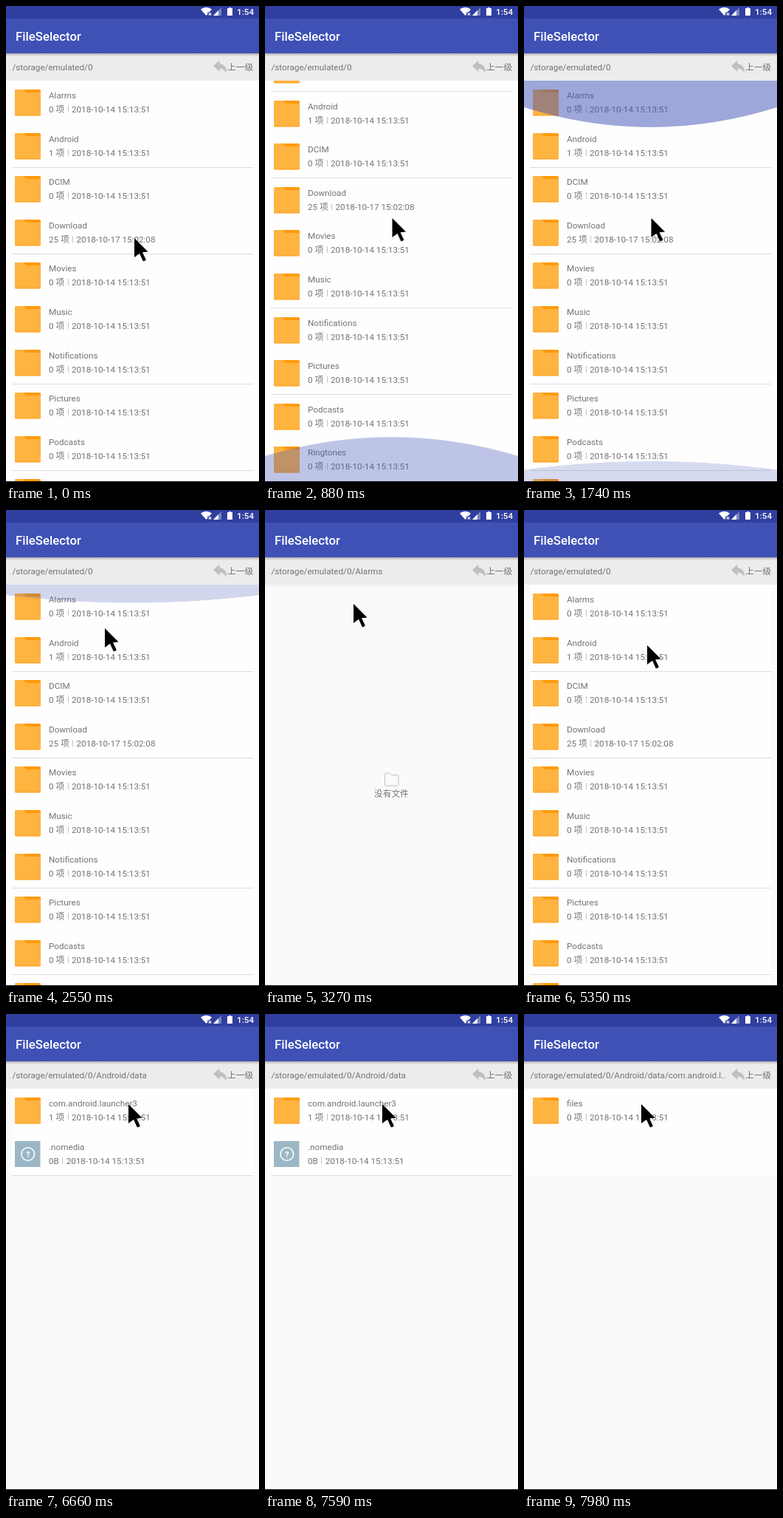
These frames come from a looping animation (343x644 px, 8 s). An HTML page:

```html
<!DOCTYPE html>
<html lang="zh-CN">
<head>
<meta charset="utf-8">
<title>FileSelector</title>
<style>
html, body { margin: 0; width: 100%; height: 100%; overflow: hidden; background: #fafafa; }
#stage {
  position: relative; width: 343px; height: 644px; overflow: hidden; background: #fafafa;
  font: 11.7px/14px Roboto, "Noto Sans CJK SC", "Noto Sans CJK", sans-serif;
  color: #737373; white-space: nowrap;
}
#stage div, #stage svg { position: absolute; }
/* Low specificity, so the id rules below can set the animation name. */
.anim { animation: 8s step-end -2ms infinite; }

#status { width: 343px; height: 17px; background: #303f9f; }
#clock { left: 313px; top: 1px; color: #fff; font-weight: 500; }
#appbar { top: 17px; width: 343px; height: 47px; background: #3f51b5; }
#title { left: 13px; top: 14px; font-size: 16.8px; line-height: 20px; font-weight: 500; color: #fff; }
#pathbar { top: 64px; width: 343px; height: 37px; background: #ececec; }
#shadow { top: 64px; width: 343px; height: 4px; background: linear-gradient(#0004, #0000); }
#up { left: 300px; top: 76px; }
#edge { top: 643px; width: 343px; height: 1px; background: #000; }

.page { inset: 0; }
.path { left: 8.5px; top: 76px; }
.list { left: 0; top: 101px; width: 343px; height: 542px; overflow: hidden; }
.paper { left: 8px; width: 327px; background: #fefefe; }
.full { left: 0; width: 343px; }
.rows { width: 343px; }
.row { left: 0; width: 343px; height: 58px; }
.row svg { left: 12px; top: 12px; }
.name { left: 58px; top: 13px; }
.info { left: 58px; top: 32px; }
.info i { display: inline-block; width: 1px; height: 9px; margin: 0 4.4px; background: #c4c4c4; }
.line { left: 8px; width: 327px; height: 1px; background: #dcdcdc; }
.glow { left: 0; }
#topGlow { top: 101px; transform-origin: 0 0; }
#bottomGlow { top: 580px; transform-origin: 0 100%; }
#cursor { left: 0; top: 0; }

#home { animation-name: home; }
#wide { animation-name: wide; }
#homeRows { animation-name: scroll; }
#home .rest { animation-name: rest; }
#home .moved { animation-name: moved; }
#alarms { animation-name: alarms; }
#android { animation-name: android; }
#data { animation-name: data; }
#launcher { animation-name: launcher; }
#topGlow { animation-name: topGlow; }
#bottomGlow { animation-name: bottomGlow; }
#cursor { animation-name: cursor; }

@keyframes home { 0%, 50.75% { opacity: 1 } 39%, 67%, 100% { opacity: 0 } }
@keyframes wide { 0% { opacity: 1 } 39%, 100% { opacity: 0 } }
@keyframes alarms { 0%, 50.75%, 100% { opacity: 0 } 39% { opacity: 1 } }
@keyframes android { 0%, 75.25%, 100% { opacity: 0 } 67% { opacity: 1 } }
@keyframes data { 0%, 98.25%, 100% { opacity: 0 } 75.25% { opacity: 1 } }
@keyframes launcher { 0% { opacity: 0 } 98.25%, 100% { opacity: 1 } }
@keyframes scroll {
  0%, 20%, 100% { transform: none }
  9.25% { transform: translateY(-20px) }
  11% { transform: translateY(-44px) }
  18.125% { transform: translateY(-24px) }
}
@keyframes rest { 0%, 20%, 100% { opacity: 1 } 9.25% { opacity: 0 } }
@keyframes moved { 0%, 20%, 100% { opacity: 0 } 9.25% { opacity: 1 } }
@keyframes bottomGlow {
  0%, 30.125%, 100% { opacity: 0; transform: scaleY(0) }
  11% { opacity: .33; transform: scaleY(.95) }
  13% { opacity: .42; transform: scaleY(1) }
  14.5% { opacity: .4; transform: scaleY(.92) }
  16.25% { opacity: .35; transform: scaleY(.78) }
  18.125% { opacity: .3; transform: scaleY(.65) }
  20% { opacity: .25; transform: scaleY(.53) }
  21.75% { opacity: .2; transform: scaleY(.43) }
  23.25% { opacity: .16; transform: scaleY(.34) }
  25% { opacity: .12; transform: scaleY(.25) }
  26.75% { opacity: .08; transform: scaleY(.16) }
  28.375% { opacity: .04; transform: scaleY(.08) }
}
@keyframes topGlow {
  0%, 42.375%, 100% { opacity: 0; transform: scaleY(0) }
  20% { opacity: .36; transform: scaleY(.75) }
  21.75% { opacity: .5; transform: scaleY(1) }
  23.25% { opacity: .48; transform: scaleY(.95) }
  25% { opacity: .43; transform: scaleY(.82) }
  26.75% { opacity: .38; transform: scaleY(.7) }
  28.375% { opacity: .33; transform: scaleY(.59) }
  30.125% { opacity: .28; transform: scaleY(.48) }
  31.875% { opacity: .23; transform: scaleY(.39) }
  33.625% { opacity: .18; transform: scaleY(.3) }
  35.25% { opacity: .14; transform: scaleY(.23) }
  37.125% { opacity: .1; transform: scaleY(.17) }
  39% { opacity: .06; transform: scaleY(.11) }
  40.875% { opacity: .03; transform: scaleY(.07) }
}
@keyframes cursor {
  0% { transform: translate(174px, 314px) }
  1.875% { transform: translate(173px, 313px) }
  9.25% { transform: translate(172.5px, 287px) }
  28.375% { transform: translate(168px, 262px) }
  30.125% { transform: translate(152px, 210px) }
  31.875% { transform: translate(134px, 160px) }
  33.625% { transform: translate(123px, 134px) }
  35.25% { transform: translate(120px, 127px) }
  42.375% { transform: translate(142px, 119px) }
  44.125% { transform: translate(196px, 102px) }
  45.875% { transform: translate(258px, 86px) }
  47.5% { transform: translate(296px, 79px) }
  49.25% { transform: translate(304px, 78px) }
  52.625% { transform: translate(240px, 104px) }
  54.625% { transform: translate(168px, 134px) }
  56.625% { transform: translate(165px, 160px) }
  58.375% { transform: translate(166px, 177px) }
  60% { transform: translate(167px, 183px) }
  68.625% { transform: translate(167px, 165px) }
  70.25% { transform: translate(166px, 138px) }
  71.75% { transform: translate(166px, 124px) }
  83.25% { transform: translate(166px, 122px) }
  85.125% { transform: translate(196px, 144px) }
  86.75% { transform: translate(252px, 170px) }
  88.375% { transform: translate(299px, 160px) }
  90% { transform: translate(272px, 128px) }
  91.625% { transform: translate(206px, 108px) }
  93.25% { transform: translate(155px, 116px) }
  94.875%, 100% { transform: translate(159px, 122px) }
}
</style>
</head>
<body>
<div id="stage">
  <div id="wide" class="anim paper full" style="top:101px;height:542px"></div>
  <div id="pathbar"></div>
  <div id="shadow"></div>
  <div id="status"></div>
  <div id="appbar"><div id="title">FileSelector</div></div>
  <div id="clock">1:54</div>
  <svg width="343" height="17" fill="#fff">
    <path d="M264 4.6Q271.500-1.200 279 4.600L275.800 8.300H273.300V11L271.500 13Z"/>
    <path d="M274.800 9.300l3.400 3.400m0-3.400l-3.400 3.400" stroke="#fff" stroke-width="1.100"/>
    <path d="M292 2V13H281Z" opacity=".35"/>
    <path d="M288 6V13H281Z"/>
    <path d="M302 2h3v1h2v10h-7V3h2Z"/>
  </svg>
  <svg width="343" height="101">
    <path d="M281 81L289.500 73.500V78Q299 79 299.300 91Q296 84.600 289.500 84.400V89Z" fill="#bfbfbf"/>
  </svg>
  <div id="up">上一级</div>

  <div id="home" class="anim page">
    <div class="path">/storage/emulated/0</div>
    <div class="list">
      <div class="paper" style="height:542px"></div>
      <div id="homeRows" class="anim rows"></div>
    </div>
  </div>
  <div id="alarms" class="anim page">
    <div class="path">/storage/emulated/0/Alarms</div>
    <svg width="343" height="400" fill="none" stroke="#c2c2c2">
      <path d="M162.500 371V357.500q0-1.500 1.500-1.500h5.500l2 2.500h8q1.500 0 1.500 1.500v11.500q0 1.500-1.500 1.500h-15.500q-1.500 0-1.500-1.500Z"/>
    </svg>
    <div style="left:148px;top:377px">没有文件</div>
  </div>
  <div id="android" class="anim page">
    <div class="path">/storage/emulated/0/Android</div>
    <div class="list"><div class="paper" style="height:59px"></div><div class="rows"></div></div>
  </div>
  <div id="data" class="anim page">
    <div class="path">/storage/emulated/0/Android/data</div>
    <div class="list"><div class="paper" style="height:117px"></div><div class="rows"></div></div>
  </div>
  <div id="launcher" class="anim page">
    <div class="path">/storage/emulated/0/Android/data/com.android.l..</div>
    <div class="list"><div class="paper full" style="height:118px"></div><div class="rows"></div></div>
  </div>

  <svg id="topGlow" class="anim glow" width="343" height="63">
    <path d="M0 0H343V36Q171.500 90 0 36Z" fill="#3f51b5"/>
  </svg>
  <svg id="bottomGlow" class="anim glow" width="343" height="63">
    <path d="M0 63H343V27Q171.500-27 0 27Z" fill="#3f51b5"/>
  </svg>
  <div id="edge"></div>
  <svg id="cursor" class="anim" width="20" height="33">
    <path d="M0 0L18.500 18.500L11 19.300L15.800 29.300Q14.500 31.500 11.800 31.300L7 20.800L0 26Z"/>
  </svg>
</div>
<script>
const PITCH = 58.6;
const DATE = '2018-10-14 15:13:51';
const FOLDER = `<svg width="35" height="36">
  <rect width="35" height="35.500" rx="1.500" fill="#ff9a0a"/>
  <path d="M0 1.500Q0 0 1.500 0H11.500L15.500 4H35V33.300Q35 34.500 33.500 34.500H1.500Q0 34.500 0 33.300Z" fill="#ffb340"/></svg>`;
const UNKNOWN = `<svg width="35" height="36">
  <rect width="34.500" height="35" fill="#9bb7c6"/>
  <circle cx="17.700" cy="17.500" r="8.800" fill="none" stroke="#fff" stroke-width="1.600"/>
  <text x="17.700" y="21.500" fill="#fff" font-size="11" font-weight="700" text-anchor="middle">?</text></svg>`;

const row = ([name, size, date = DATE, icon = FOLDER], i) =>
  `<div class="row" style="top:${Math.round(i * PITCH)}px">${icon}
    <div class="name">${name}</div><div class="info">${size}<i></i>${date}</div></div>`;
const line = (n, kind = '') =>
  `<div class="line ${kind}" style="top:${Math.floor(n * PITCH)}px"></div>`;

function fill(page, items, lines = '') {
  document.querySelector(`#${page} .rows`).innerHTML = items.map(row).join('') + lines;
}

const folders = ['Alarms', 'Android', 'DCIM', 'Download', 'Movies', 'Music',
  'Notifications', 'Pictures', 'Podcasts', 'Ringtones'].map(name =>
  name === 'Download' ? [name, '25 项', '2018-10-17 15:02:08']
    : [name, name === 'Android' ? '1 项' : '0 项']);

// Hairlines fall on different rows at rest and while scrolled.
fill('home', folders,
  [2, 4, 7, 9].map(n => line(n, 'anim rest')).join('') +
  [1, 3, 6, 8].map(n => line(n, 'anim moved')).join(''));
fill('android', [['data', '2 项']]);
fill('data', [['com.android.launcher3', '1 项'], ['.nomedia', '0B', DATE, UNKNOWN]], line(2));
fill('launcher', [['files', '0 项']]);
</script>
</body>
</html>
```
